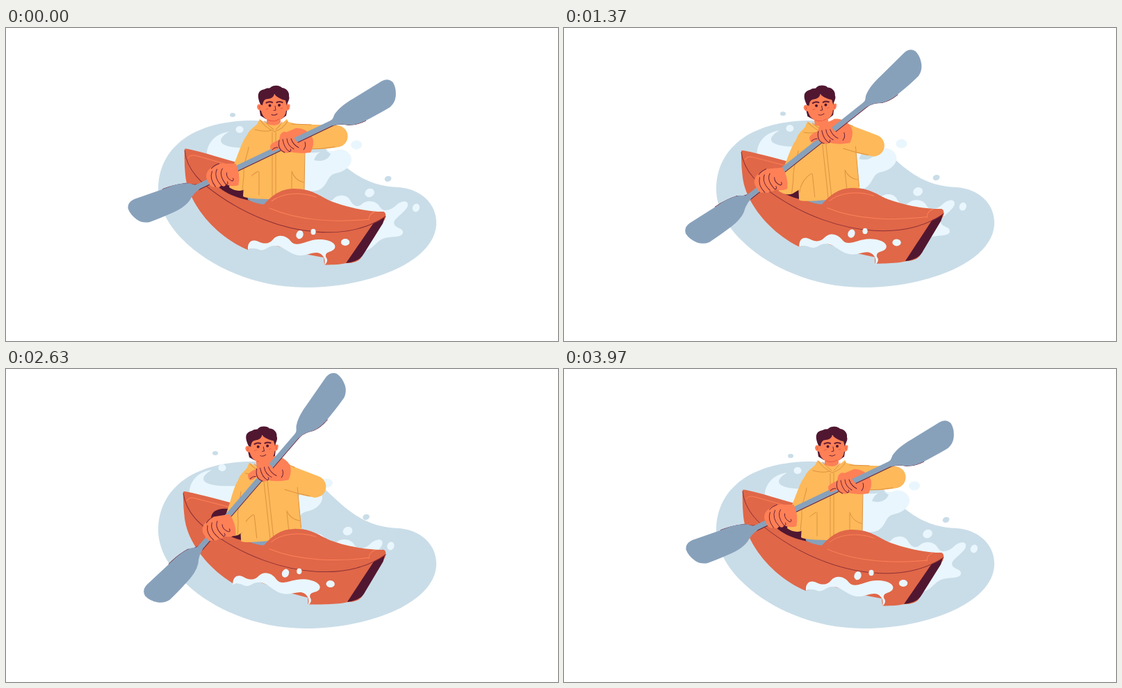
Write an HTML page without scripts that moves like this. It is 794x450 px and loops after 4.01 s.

```html
<!DOCTYPE html>
<html lang="en">
<head>
<meta charset="utf-8">
<title>Kayak</title>
<style>
/* --a paddle angle, --l lean to the left, --s sleeve swing, --w water drift */
@property --a { syntax: "<number>"; inherits: true; initial-value: 25.5; }
@property --l { syntax: "<number>"; inherits: true; initial-value: 0; }
@property --s { syntax: "<number>"; inherits: true; initial-value: 0; }
@property --w { syntax: "<number>"; inherits: true; initial-value: 0; }

html, body { margin: 0; width: 100%; height: 100%; overflow: hidden; background: #fff; }
svg { display: block; width: 794px; height: 450px; animation: row 4010ms linear infinite; }

@keyframes row {
  0%    { --a: 25.5; --l: 0;   --s: 0;  --w: 0; }
  4.5%  { --a: 25.8; --l: .04; --w: .01; }
  9.2%  { --a: 26.8; --l: .16; --s: 2;  --w: .03; }
  13.2% { --a: 28.3; --l: .3; }
  18%   { --a: 30.8; --l: .51; --w: .08; }
  23.2% { --a: 33.5; --l: .72; --s: 6;  --w: .14; }
  26.7% { --a: 35.2; --l: .82; --w: .22; }
  33%   { --a: 38;   --l: .93; --w: .41; }
  39.9% { --a: 40.6; --l: .99; --w: .6; }
  45.6% { --a: 42.6; --l: 1;   --s: 7;  --w: .74; }
  53.1% { --a: 45;   --l: 1;   --w: .87; }
  65.6% { --a: 49.2; --l: .96; --s: 2;  --w: 1; }
  67.3% { --a: 50;   --l: .92; --w: .99; }
  72%   { --a: 45.4; --l: .75; --w: .86; }
  78.1% { --a: 38.3; --l: .5;  --s: -1; --w: .63; }
  79.8% { --a: 36.4; --l: .44; --w: .55; }
  86%   { --a: 30.6; --l: .23; --w: .26; }
  93%   { --a: 26.5; --l: .06; --w: .05; }
  99%, 100% { --a: 25.5; --l: 0; --s: 0; --w: 0; }
}

.boat { transform: translate(calc(var(--l) * -1px), calc(var(--l) * -.8px)) rotate(calc(var(--l) * -1.4deg)); transform-origin: 400px 220px; }
.torso { transform: translate(calc(var(--l) * -3px), calc(var(--l) * .5px)) rotate(calc(var(--l) * -6.5deg)); transform-origin: 386px 245px; }
.head { transform: translate(calc(var(--l) * -17.5px), 0) rotate(calc(var(--l) * -3deg)); transform-origin: 385px 112px; }
.sleeve { transform: rotate(calc(var(--s) * 1deg)); transform-origin: 345px 158px; }
.arm { transform: translate(calc(473px - var(--l) * 32.5px), calc(156px + var(--l) * 13px)) rotate(calc(var(--l) * 20deg)); }
.paddle { transform: translate(calc(372.5px - var(--l) * 24.2px), calc(182.5px - var(--l) * 6.5px)) rotate(calc(var(--a) * -1deg)); }
.left { transform: translate(-71px, 0) rotate(calc(var(--a) * .6deg + 10.2deg)); }
.right { transform: translate(36px, 0) rotate(calc(var(--a) * .9deg + 2.5deg)); }
.drift { transform: translate(calc(var(--w) * var(--dx) * -1px), calc(var(--w) * -4px)); }
.wash { transform: translate(calc(var(--w) * -22.5px), calc(var(--w) * -1px)) rotate(calc(var(--w) * 4deg)); transform-origin: 460px 325px; }

.blob { fill: #c9dde8; }
.foam { fill: #e9f6fd; }
.hull { fill: #e06748; }
.dark { fill: #511731; }
.steel { fill: #88a1bb; }
.coat { fill: #fdb95a; }
.skin { fill: #fe8056; }
.line { fill: none; stroke-width: 1; stroke-linecap: round; stroke-linejoin: round; }
.seam { stroke: #de9340; }
.edge { stroke: #8b3036; }
.glow { stroke: #fd8259; }
.ink { stroke: #6b2137; }
.brow { stroke-width: 2.2; }
.blush { stroke: #e85a43; }
</style>
</head>
<body>
<svg viewBox="0 0 794 450" aria-label="Man paddling a kayak">
  <defs>
    <path id="blade" d="M106 -4C112 -4 113 -9 118 -11C126 -15 136 -17.500 150 -18.500L197 -23.500Q208 -24 211 -15Q212 -5 206 5Q201 13 192 15.500Q178 17 160 17.500Q138 19 126 12.500Q116 5 106 4Z"/>
  </defs>

  <path class="blob" d="M350 133C400 132 432 148 457 171C487 199 512 227 565 229C600 232 619 255 619 280C619 335 525 373 430 373C317 373 219 299 219 232C219 175 265 135 350 133Z"/>

  <!-- water behind the boat -->
  <g class="drift" style="--dx:25">
    <path class="foam" d="M289 186C287 168 299 152 321 149C311 155 307 160 310 165C317 172 335 173 360 172L380 205Z"/>
    <ellipse class="foam" cx="336" cy="146" rx="5.5" ry="5"/>
    <ellipse class="blob" cx="326" cy="125" rx="4" ry="3"/>
  </g>
  <g class="drift" style="--dx:42">
    <path class="foam" d="M410 172Q440 184 460 176Q470 178 474 176C484 171 497 179 497 189C496 201 484 207 474 209C460 212 464 230 446 234L400 240Z"/>
    <path class="blob" d="M443 190C446 181 453 176 460 176L467 181C463 190 453 193 443 190Z"/>
    <ellipse class="foam" cx="504" cy="168" rx="8" ry="6.5"/>
  </g>
  <g class="drift" style="--dx:36.500">
    <path class="foam" d="M440 262L470 247C476 239 489 239 494 246C499 256 506 259 512 253C520 246 533 249 537 256C542 266 554 262 561 255C568 248 578 247 578 254C578 263 558 273 558 280C559 289 571 286 571 294C570 303 552 298 540 304C530 310 528 318 512 322L470 310Z"/>
    <ellipse class="foam" cx="590" cy="258.500" rx="5" ry="6" transform="rotate(20 590 258)"/>
  </g>
  <g class="drift" style="--dx:31.500">
    <ellipse class="foam" cx="523" cy="237" rx="7" ry="6" transform="rotate(-25 523 237)"/>
    <ellipse class="blob" cx="549.500" cy="217" rx="5" ry="4" transform="rotate(-20 549 217)"/>
  </g>

  <g class="boat">
    <path class="hull" d="M257 174Q258 173 262 174C285 179 310 187 345 197L400 231L415 231C440 231 453 243 465 248C490 258 520 264 543 264Q548 266 545 275L512 328Q508 338 490 338C478 340.500 466 340.500 458 340.500C420 341 385 336 348 319C300 299 262 252 258 212Q256 192 257 174Z"/>
    <path class="dark" d="M545 271L542 281L515 324Q509 336 489 338L529 280Q539 276 545 271Z"/>
    <path class="dark" d="M296 214C296 202 308 197 328 201L350 230L352 248C325 244 300 230 296 214Z"/>
    <path class="steel" d="M347 240H384L374 254Q360 253 348 247Z"/>
    <path class="line glow" d="M262 187Q265 181 275 184L325 198"/>
    <path class="line edge" d="M257 176C260 205 282 224 305 240C345 268 395 289 445 293C490 297 524 286 546 271"/>
  </g>

  <g class="torso">
    <path class="skin" d="M375 124H395V136Q385 146 375 138Z"/>
    <path class="coat" d="M364 136C356 143 349 147 346 156L341 242Q346 246 386 246L429 240L430 152L422 139L406 135L386 146Z"/>
  </g>
  <g class="arm">
    <path class="coat" d="M-58 -18L2 -16A16 15.700 0 0 1 3 15.500Q-16 19 -37 18H-58Z"/>
    <path class="line seam" d="M-62 -18L-34 -17M-37 18Q-18 18 0 15"/>
  </g>
  <g class="torso">
    <path class="coat" d="M365 131Q376 140 386 140Q396 139 404 131L409 142Q401 151 386 149Q369 152 357 146Z"/>
    <path class="line seam" d="M366 133Q373 143 386 149Q399 145 405 134M372 134Q378 141 385 146M397 135Q393 142 388 146M358 146Q372 150 382 147M383 150V245M388 150V245M363 206C352 211 345 221 343 231M364 207V240M411 206C414 215 420 220 428 222M411 208V238M430 174L429 232"/>
    <g class="sleeve">
      <path class="coat" d="M351 150C340 158 335 181 326 200L321 229Q331 236 341 233L352 226L356 180Z"/>
      <path class="line seam" d="M349 171C347 186 341 192 342 213L340 232"/>
    </g>
  </g>

  <g class="head">
    <path class="dark" d="M364 114L366 126L374 131H396L403 126L405 114Z"/>
    <path class="skin" d="M367 96H403L405 110Q410 108 408 115Q407 119 403 119C402 128 395 134 385 134C375 134 369 128 367 119Q361 118 361 113Q362 108 366 110Z"/>
    <path class="dark" d="M366 110C361 98 361 90 372 88C376 85 379 88 381 85C386 81 395 83 397 86C402 86 408 91 407 98C409 103 404 107 404 112L402 104C397 103 390 100 386 95Q384 102 376 102Q370 102 369 111Z"/>
    <path class="line ink brow" d="M374.500 107.500Q379 105 383 107M389.500 107Q393 105 397.500 107"/>
    <circle class="dark" cx="379.500" cy="111.500" r="2"/>
    <circle class="dark" cx="393" cy="111" r="2"/>
    <path class="line ink" d="M387 112L388 118L385 118.500M382 124.500Q386 126.500 390 123.500"/>
    <path class="line blush" d="M374 117L377 116M395 116L398 115M364 112Q366 114 364 116M406 112Q404 114 406 116M377 132Q385 136 393 131"/>
  </g>

  <!-- front deck hides the lap -->
  <g class="boat">
    <path class="hull" d="M370 255C386 236 400 231 415 231C440 231 453 243 465 248L480 280L420 282Z"/>
    <path class="line glow" d="M382 249C397 237 423 235 446 243M379 259C420 277 475 280 522 275M522 276Q521 268 531 264"/>
  </g>

  <g class="paddle">
    <g class="right">
      <path class="skin" d="M-10 -2C-10 -10 -8 -16 -2 -17L12 -23Q22 -24 31 -16Q42 -6 33 12Q15 15 0 10Z"/>
    </g>
    <path class="line ink" d="M-107 -4Q-114 -6 -120 -12Q-136 -18 -154 -19M107 4Q117 5 127 13Q137 18 152 18"/>
    <rect class="steel" x="-110" y="-4" width="220" height="8"/>
    <path class="line ink" d="M-108 4.200H108"/>
    <use class="steel" href="#blade"/>
    <use class="steel" href="#blade" transform="scale(-1 1)"/>
    <g class="right">
      <path class="skin" d="M-25 3Q-24 -2 -12 -6Q-11 -17 -5 -18Q5 -17 9 -9L15 -2Q19 2 16 6Q13 8 10 6Q9 11 4 10Q2 14 -3 12Q-9 12 -13 6Q-18 10 -22 10Q-25 8 -25 3Z"/>
      <path class="line ink" d="M-22 8Q-18 4 -14 5M-12 -6Q-15 8 -4 12M-7 -7Q-5 6 3 11Q6 9 4 7M-1 -8Q0 2 9 7M5 -8Q8 1 16 5M25 -3Q27 4 23 8"/>
    </g>
    <g class="left">
      <path class="skin" d="M-20 3C-22 -8 -13 -14 -2 -18L22 -18Q29 -4 26 13Q18 16 8 12Q6 17 1 13Q-1 18 -7 15Q-14 17 -17 10Z"/>
      <path class="line ink" d="M-12 -7Q-16 4 -7 15M-5 -10Q-10 1 1 13M3 -11Q-3 -2 8 12Q12 12 10 8M9 -5Q8 3 17 7Q20 5 18 3M-2 -18Q-10 -15 -13 -11"/>
    </g>
  </g>

  <!-- water in front of the hull -->
  <g class="wash">
    <path class="blob" d="M348 319L362 313L385 312L425 324L457 330L458 341V350H348Z"/>
    <path class="foam" d="M348 319C347 307 354 303 363 307C373 312 380 309 384 304C392 295 404 299 410 307C419 317 432 304 450 304C469 304 477 312 472 318C467 323 459 321 460 329Q465 335 458 341Q460 333 456 328C448 318 438 326 426 327C408 328 401 313 386 313C376 313 374 321 365 319C358 316 353 316 348 319Z"/>
    <ellipse class="foam" cx="422.500" cy="297" rx="5" ry="6.200" transform="rotate(20 422 297)"/>
    <ellipse class="foam" cx="442" cy="293" rx="3.600" ry="4.200"/>
    <ellipse class="foam" cx="488" cy="308" rx="6.200" ry="5"/>
  </g>
</svg>
</body>
</html>
```
